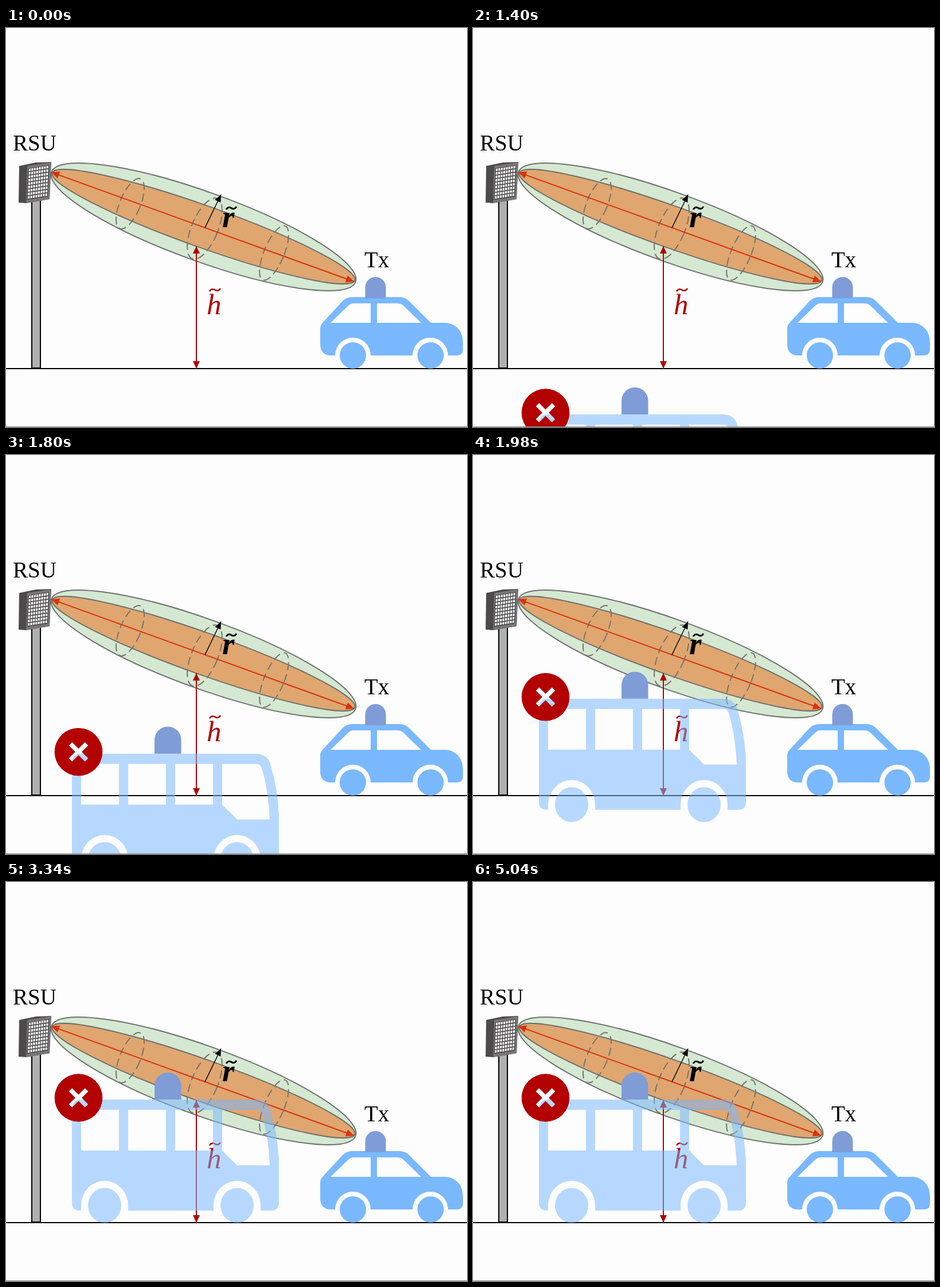
An HTML page for the animation above (5060 ms loop, 804 by 697 pixels).

```html
<!DOCTYPE html>
<html lang="en">
<head>
<meta charset="utf-8">
<title>Beam blockage</title>
<style>
  html, body { margin: 0; width: 100%; height: 100%; overflow: hidden; background: #fdfdfe; }
  svg { display: block; width: 804px; height: 697px; }
  text { font-family: "Liberation Serif", "Times New Roman", serif; font-size: 39px; }
  .line { fill: none; stroke-width: 2; }
  .edge { stroke: #6d716d; stroke-width: 2; }
  .ring { fill: none; stroke: #77736a; stroke-width: 2; stroke-dasharray: 14 7; }
  .blue { fill: #7ab8ff; fill-rule: evenodd; }
  .lamp { fill: #7f9cd6; }
</style>
</head>
<body>
<svg viewBox="0 0 804 697">
  <defs>
    <marker id="head" viewBox="0 0 14 14" refX="14" refY="7" markerWidth="14" markerHeight="14"
            markerUnits="userSpaceOnUse" orient="auto-start-reverse">
      <path d="M0 .5 14 7 0 13.5z" fill="#d6330f"/>
    </marker>
    <marker id="headDark" viewBox="0 0 14 14" refX="14" refY="7" markerWidth="13" markerHeight="13"
            markerUnits="userSpaceOnUse" orient="auto-start-reverse">
      <path d="M0 .5 14 7 0 13.5z" fill="#b00000"/>
    </marker>
    <marker id="headBlack" viewBox="0 0 14 14" refX="14" refY="7" markerWidth="13" markerHeight="13"
            markerUnits="userSpaceOnUse" orient="auto">
      <path d="M0 1 14 7 0 13z"/>
    </marker>
    <mask id="cross" maskUnits="userSpaceOnUse" x="80" y="330" width="92" height="94">
      <circle cx="126.500" cy="377" r="42" fill="#fff"/>
      <path d="M112.500 363l28 28m0-28l-28 28" stroke="#000" stroke-width="8"/>
    </mask>
  </defs>

  <path class="line" d="M0 595H804" stroke="#000"/>

  <!-- roadside unit -->
  <rect x="45" y="296" width="15" height="298" fill="#b0b0b0" stroke="#000" stroke-width="2"/>
  <path d="M23 241 52 235 79 234 76 299 35 306 22 305z" fill="#4c4a4a"/>
  <path d="M37 241 78.500 234.500 76 299 35 306z" fill="#787676"/>
  <g id="cells" fill="#fff" transform="matrix(35 -5.500 -2 54 40 246)">
    <path d="M-.04-.02H1V1H-.04z" fill="#4c4a4a"/>
  </g>
  <text x="12" y="214">RSU</text>

  <!-- car -->
  <path class="blue" d="M548 533V525Q548 519 553 514L587 477Q594 470 604 470H686Q696 470 703 477L741 515H768
    C786 517 797 531 797 549V561Q797 572 786 572H771A31 31 0 0 0 709 572H636A31 31 0 0 0 574 572H564
    Q548 570 548 552z
    M566 515H636V481H606Q601 481 597 485z M647 515H724L692 484Q688 481 683 481H647z"/>
  <circle class="blue" cx="605" cy="572" r="23"/>
  <circle class="blue" cx="740.500" cy="572" r="23"/>
  <path class="lamp" d="M626.500 472V453A18 18 0 0 1 662.500 453V472z"/>
  <text x="625" y="418">Tx</text>

  <!-- beam -->
  <ellipse class="edge" rx="282" ry="60.500" fill="#d5e8d2" transform="translate(344.500 347.500) rotate(19.900)"/>
  <ellipse class="edge" rx="280" ry="36.500" fill="#e0a670" transform="translate(344.500 347) rotate(19.600)"/>
  <ellipse class="ring" rx="18" ry="47" transform="translate(216.500 307) rotate(22.500)"/>
  <ellipse class="ring" rx="23" ry="57" transform="translate(346.500 350.500) rotate(22.500)"/>
  <ellipse class="ring" rx="17.500" ry="51" transform="translate(467.500 393) rotate(22.500)"/>
  <path class="line" d="M79 252 607 443" stroke="#d6330f" marker-start="url(#head)" marker-end="url(#head)"/>
  <path d="M347 349 375 291" stroke="#000" stroke-width="1.500" marker-end="url(#headBlack)"/>
  <text x="377" y="348" style="font-size:55px;font-weight:bold;font-style:italic">r</text>
  <path class="line" d="M384 317q4-6 9-2.500t9-2.500" stroke="#000" style="stroke-width:3"/>

  <!-- height -->
  <path class="line" d="M332 381V595" stroke="#b00000" marker-start="url(#headDark)" marker-end="url(#headDark)"/>
  <text x="350" y="500" fill="#b00000" style="font-size:51px;font-style:italic">h</text>
  <path class="line" d="M355 460q4-6 9.500-2.500t9.500-2.500" stroke="#b00000" style="stroke-width:2.500"/>

  <g id="bus">
    <g opacity=".53">
      <path class="blue" d="M115 396Q115 380 131 380H434Q456 380 461 398Q474 440 476 488V560Q476 574 462 574H444
        V565A41 43 0 0 0 362 565V574H213V565A41 43 0 0 0 131 565V574H129Q115 574 115 560z
        M131 398V469H197V398z M213 398V469H279V398z M295 398V469H361V398z
        M377 398V469L403 495H460Q457 440 446 405Q444 398 437 398z"/>
      <ellipse class="blue" cx="172" cy="565" rx="29" ry="30.500"/>
      <ellipse class="blue" cx="403" cy="565" rx="29" ry="30.500"/>
    </g>
    <path class="lamp" d="M259 380V356A23.250 23.250 0 0 1 305.500 356V380z"/>
    <circle cx="126.500" cy="377" r="42" fill="#b30000" mask="url(#cross)"/>
  </g>

  <path d="M0 696.500H804" stroke="#8a8a8a"/>
</svg>
<script>
  const LOOP = 5060, COLS = 8, ROWS = 9, FILL = 0.7;
  const bus = document.getElementById("bus");

  let cells = "";
  for (let r = 0; r < ROWS; r++)
    for (let c = 0; c < COLS; c++)
      cells += `<rect x="${c / COLS}" y="${r / ROWS}" width="${FILL / COLS}" height="${FILL / ROWS}"/>`;
  document.getElementById("cells").insertAdjacentHTML("beforeend", cells);

  // The picture advances in uneven beats: 100, 20, 20 ms.
  function step(t) {
    const beat = Math.floor((t - 1000) / 140);
    const rest = t - 1000 - beat * 140;
    return beat * 3 + (rest < 100 ? 0 : rest < 120 ? 1 : 2);
  }

  // The bus rises at constant speed, then stays.
  function draw() {
    const drop = 295 - 19.17 * (step(performance.now() % LOOP) - 8);
    bus.setAttribute("transform", `translate(0 ${Math.min(380, Math.max(0, drop))})`);
    requestAnimationFrame(draw);
  }
  draw();
</script>
</body>
</html>
```
